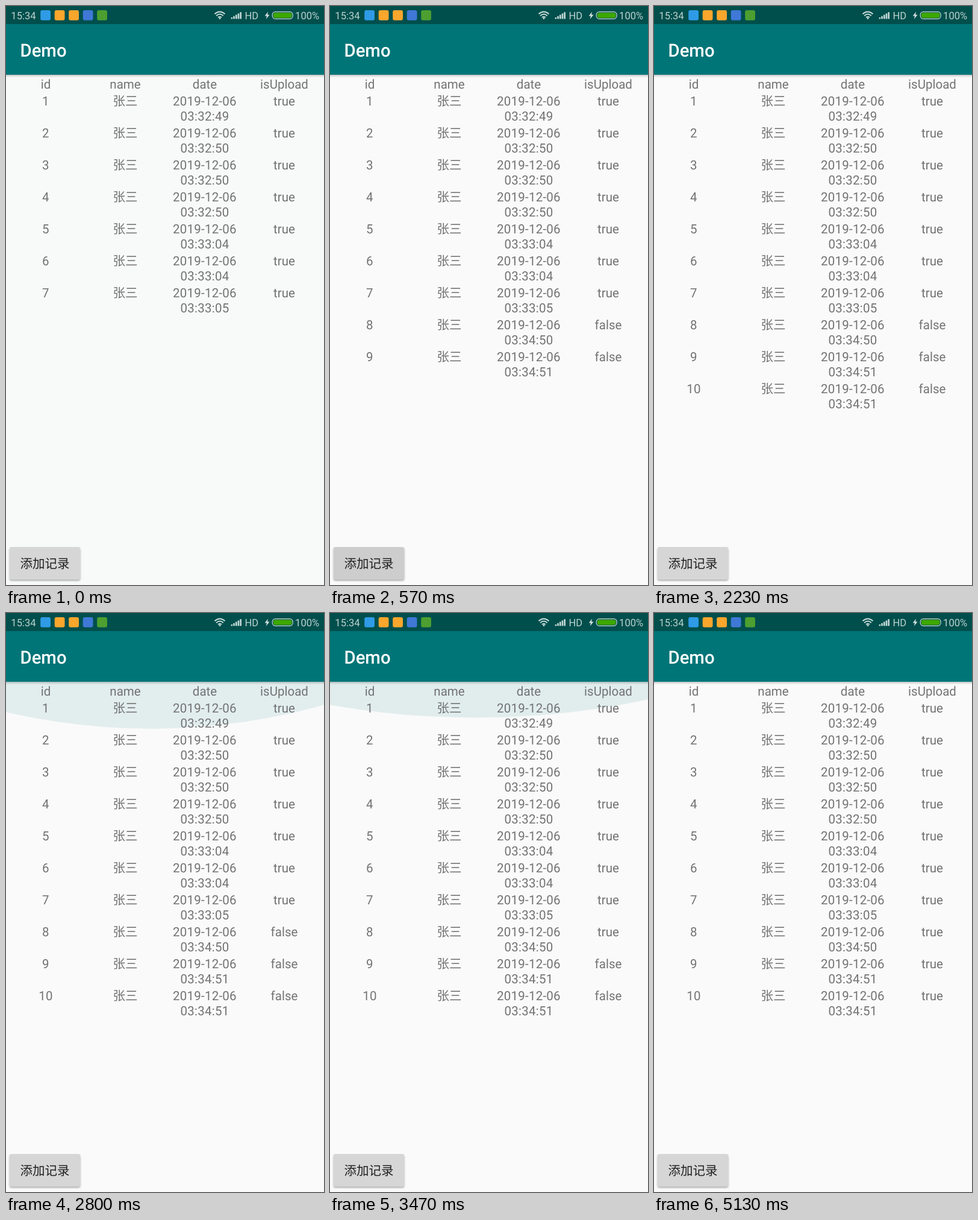
Animation, 528 px wide and 960 px high, one loop 5510 ms. Source, as an HTML page:

```html
<!DOCTYPE html>
<html lang="zh-CN">
<head>
<meta charset="utf-8">
<title>Demo</title>
<style>
  html, body { margin: 0; width: 100%; height: 100%; overflow: hidden; background: #fafafa; }
  svg { display: block; width: 528px; height: 960px; }
  text { font-family: Roboto, "Noto Sans CJK SC", "Noto Sans CJK", sans-serif; text-rendering: geometricPrecision; }
  .cell { font-size: 21px; fill: #737373; text-anchor: middle; }
  .digits { letter-spacing: .21px; }
  .status { font-size: 17px; fill: #bcd2d0; }
  .bar { filter: drop-shadow(0 1.5px 2px rgba(0, 0, 0, .34)); }
  .button { filter: drop-shadow(0 2px 1.5px rgba(0, 0, 0, .3)); }
</style>
</head>
<body>
<!-- A 9:16 phone screen, slightly narrowed to the stage -->
<svg viewBox="0 0 540 960" preserveAspectRatio="none" xmlns="http://www.w3.org/2000/svg">
  <rect id="page" width="540" height="960" fill="#fafafa"/>
  <ellipse id="glow" cx="246.5" rx="810" fill="#007578"/>
  <g id="table"></g>

  <rect class="button" x="6" y="897" width="120" height="54" rx="3" fill="#d6d6d6"/>
  <rect id="press" x="6" y="897" width="120" height="54" rx="3"/>
  <text x="66" y="932.25" font-size="21" text-anchor="middle" fill="#212121">添加记录</text>

  <rect class="bar" x="-10" y="-10" width="560" height="124" fill="#007578"/>
  <rect width="540" height="30" fill="#004f4c"/>
  <text x="24" y="83.75" font-size="30" font-weight="500" fill="#fff">Demo</text>

  <text class="status" x="8.5" y="22">15:34</text>
  <text class="status" x="405.5" y="22">HD</text>
  <text class="status" x="491" y="22">100%</text>
  <g transform="scale(1.0227 1)">
    <g id="icons"></g>
    <path d="M346.5 13.2Q355 5.6 363.5 13.2M349.2 16.2Q355 11 360.8 16.2M352 19Q355 16.4 358 19"
      fill="none" stroke="#c6dad8" stroke-width="1.9"/>
    <circle cx="355" cy="20.6" r="1.5" fill="#c6dad8"/>
    <g id="signal" fill="#c6dad8"></g>
    <path d="M435 9.5L429.8 16.6H433L431.8 21.8L437.6 14.4H434.2Z" fill="#d3e2e0"/>
    <rect x="442.2" y="9.7" width="34" height="11.6" rx="5" fill="#004f4c" stroke="#c6dad8" stroke-width="1.2"/>
    <rect x="443.8" y="11.3" width="30.8" height="8.4" rx="3.6" fill="#3ea800"/>
  </g>
</svg>
<script>
const LOOP = 5510;
const $ = id => document.getElementById(id);

function add(parent, tag, attrs, label) {
  const el = document.createElementNS("http://www.w3.org/2000/svg", tag);
  for (const key in attrs) el.setAttribute(key, attrs[key]);
  if (label) el.textContent = label;
  return parent.appendChild(el);
}

// Status bar
["#2f9be6", "#fba62d", "#fba62d", "#3f78d6", "#4c9f30"].forEach((fill, i) =>
  add($("icons"), "rect", { x: 57.2 + 23.5 * i, y: 7, width: 16.8, height: 16.8, rx: 3, fill }));
for (let i = 0; i < 5; i++) {
  const height = 2.4 + 2.2 * i;
  add($("signal"), "rect", { x: 373.6 + 3.7 * i, y: 21.4 - height, width: 2.6, height });
}

// Table
const LINE = 24.5, ROW = 53;

function cell(parent, col, y, label) {
  const kind = /^\d/.test(label) ? "cell digits" : "cell";
  return add(parent, "text", { class: kind, x: 67.5 + 135 * col, y }, label);
}

["id", "name", "date", "isUpload"].forEach((label, col) => cell($("table"), col, 136.5, label));

const times = ["32:49", "32:50", "32:50", "32:50", "33:04", "33:04", "33:05", "34:50", "34:51", "34:51"];
const added = { 8: 130, 9: 530, 10: 930 };
const uploaded = { 8: 2920, 9: 4030, 10: 5130 };

const rows = times.map((time, i) => {
  const id = i + 1, y = 165 + ROW * i;
  const group = add($("table"), "g", {});
  cell(group, 0, y, String(id));
  cell(group, 1, y, "张三");
  cell(group, 2, y, "2019-12-06");
  cell(group, 2, y + LINE, "03:" + time);
  return { group, flag: cell(group, 3, y, "true"), from: added[id] || 0, sent: uploaded[id] || 0 };
});

// Overscroll pulls: start, release, end, peak stretch, peak opacity
const pulls = [
  { start: 2570, release: 2700, end: 3200, stretch: 1.125, alpha: .156 },
  { start: 3200, release: 3600, end: 4200, stretch: .85, alpha: .158 }
];
const TOP = 114, RADIUS = 810, DEPTH = 108.5;

function drawGlow(t) {
  const pull = pulls.find(p => t >= p.start && t < p.end);
  let level = 0;
  if (pull) {
    level = t < pull.release
      ? ((t - pull.start) / (pull.release - pull.start)) ** 1.13
      : ((pull.end - t) / (pull.end - pull.release)) ** 2;
  }
  const scale = pull ? Math.min(1, pull.stretch * level) : 0;
  const glow = $("glow");
  glow.setAttribute("cy", TOP + (DEPTH - RADIUS) * scale);
  glow.setAttribute("ry", RADIUS * scale);
  glow.setAttribute("opacity", pull ? pull.alpha * level : 0);
}

const taps = [30, 430, 830];

function pressLevel(t) {
  const down = taps.filter(tap => t >= tap).pop();
  if (down === undefined) return 0;
  const age = t - down;
  return age < 100 ? age / 100 : Math.max(0, 1 - (age - 100) / 300);
}

function draw(t) {
  $("page").setAttribute("fill", t < 30 ? "#f8faf9" : "#fafafa");
  for (const { group, flag, from, sent } of rows) {
    group.style.display = t >= from ? "" : "none";
    const label = t >= sent ? "true" : "false";
    if (flag.textContent !== label) flag.textContent = label;
  }
  $("press").setAttribute("opacity", .05 * pressLevel(t));
  drawGlow(t);
}

const begin = performance.now();
function tick() {
  draw((performance.now() - begin) % LOOP);
  requestAnimationFrame(tick);
}
tick();
</script>
</body>
</html>
```
